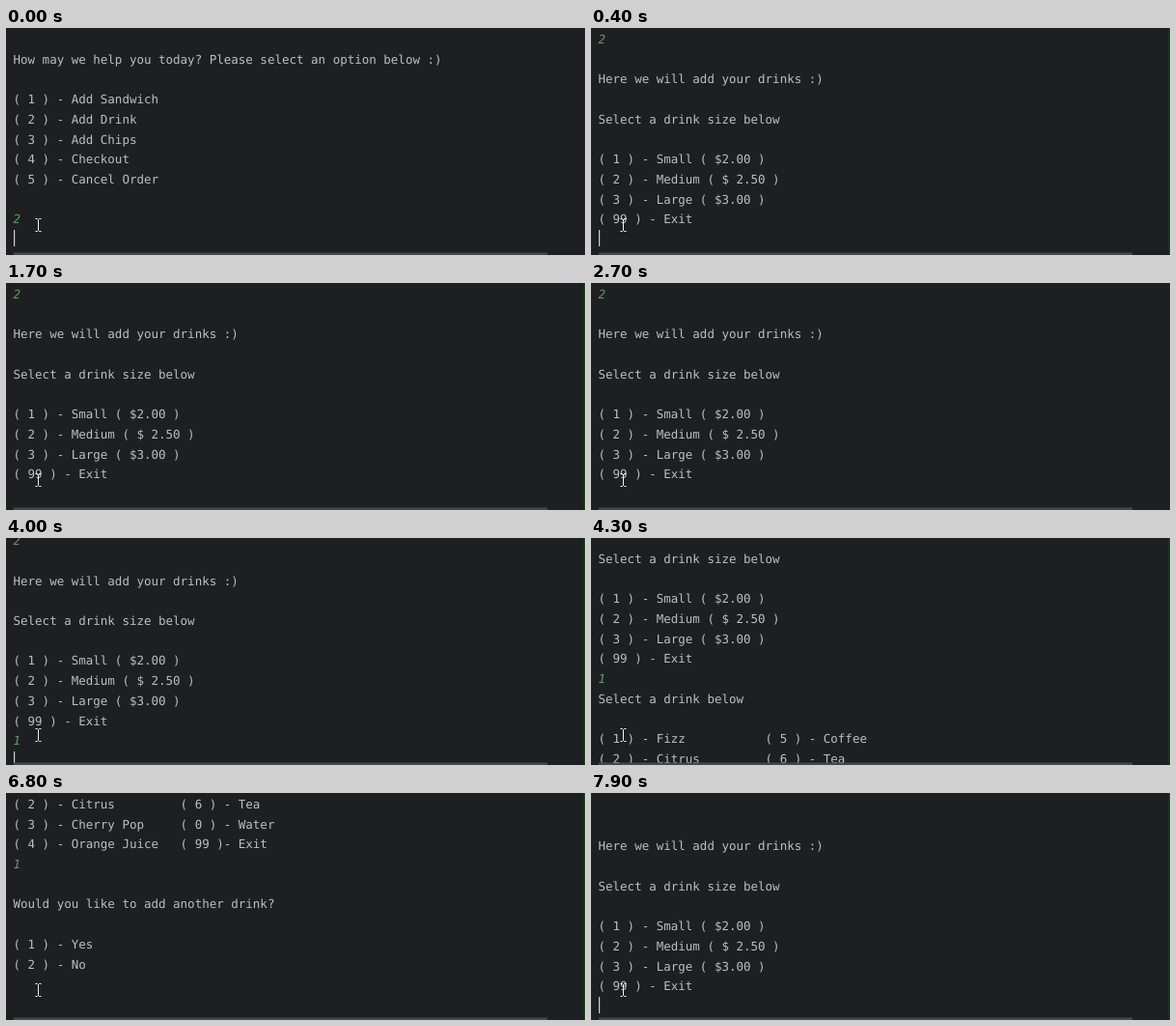
An HTML page that plays this animation: 600 by 235 pixels, repeating every 8 s.

```html
<!DOCTYPE html>
<html lang="en">
<head>
<meta charset="utf-8">
<title>Order console</title>
<style>
  html, body { margin: 0; width: 100%; height: 100%; overflow: hidden; background: #1e1f22; }
  svg { display: block; }
  text {
    font: 12.5px "DejaVu Sans Mono", monospace;
    fill: #bcbec4;
    white-space: pre;
    text-rendering: geometricPrecision;
  }
  .input { fill: #629a68; font-style: italic; }
</style>
</head>
<body>
<svg width="600" height="235" viewBox="0 0 600 235">
  <g id="console">
    <rect id="caret" width="1.2" height="17" fill="#ced0d6"/>
  </g>
  <rect x="8" y="232.5" width="553" height="2.5" fill="#47484a"/>
  <rect id="edge" x="598.5" width="1.5" height="234" fill="#0a450c"/>
  <path d="M30.5 197.5h2l1 1l1-1h2M33.5 198.5v11M30.5 210.5h2l1-1l1 1h2" fill="none" stroke="#f0f0f0"/>
</svg>
<script>
const LOOP = 8000, FRAME = 100;
const LEFT = 7.5, CHAR = 7.53, LINE = 20.7, BASELINE = 16;
const SCROLL_TIME = 120, BLINK_DELAY = 640, BLINK = 500;

const byId = id => document.getElementById(id);
const output = byId("console"), caret = byId("caret"), edge = byId("edge");
const show = (node, visible) => node.setAttribute("visibility", visible ? "visible" : "hidden");

const item = (key, label) => `( ${key} ) - ${label}`;
const menu = labels => labels.map((label, i) => item(i + 1, label));
const pair = (left, right) => left.padEnd(23) + right;

const sizeMenu = [
  "Here we will add your drinks :)", "",
  "Select a drink size below", "",
  ...menu(["Small ( $2.00 )", "Medium ( $ 2.50 )", "Large ( $3.00 )"]),
  item(99, "Exit"),
];

// Each event writes lines from the caret row; `advance` is how far the caret then moves down.
const events = [];
const texts = [];
let rowCount = 0;

function write(time, lines, advance, column, className) {
  lines.forEach((line, i) => {
    const node = document.createElementNS("http://www.w3.org/2000/svg", "text");
    node.setAttribute("x", LEFT);
    node.setAttribute("y", BASELINE + (rowCount + i) * LINE);
    node.setAttribute("class", className);
    node.textContent = line;
    output.append(node);
    texts.push({ node, time });
  });
  rowCount += advance;
  events.push({ time, advance, column, row: rowCount });
}
const print = (time, lines) => write(time, lines, lines.length, 0, "output");
function type(key, typed, entered) {
  write(typed, [key], 0, 1, "input");
  write(entered, [], 1, 0, "input");
}

const before = -LOOP;
print(before, [
  "", "How may we help you today? Please select an option below :)", "",
  ...menu(["Add Sandwich", "Add Drink", "Add Chips", "Checkout", "Cancel Order"]), "",
]);
type("2", before, before);
const bottomRow = rowCount;

print(60, ["", ...sizeMenu]);
type("1", 3600, 3980);
print(4280, [
  "Select a drink below", "",
  pair(item(1, "Fizz"), item(5, "Coffee")),
  pair(item(2, "Citrus"), item(6, "Tea")),
  pair(item(3, "Cherry Pop"), item(0, "Water")),
  pair(item(4, "Orange Juice"), "( 99 )- Exit"),
]);
type("1", 5500, 6060);
print(6090, ["", "Would you like to add another drink?", "", ...menu(["Yes", "No"]), ""]);
type("1", 7400, 7605);
print(7806, ["", "", ...sizeMenu]);

const easeOut = p => 1 - (1 - Math.min(p, 1)) ** 3;

function draw(t) {
  const past = events.filter(event => event.time <= t);
  const last = past.at(-1);
  const scroll = past.reduce(
    (sum, { time, advance }) => sum + advance * easeOut((t - time) / SCROLL_TIME), -bottomRow);
  output.setAttribute("transform", `translate(0 ${-scroll * LINE})`);

  caret.setAttribute("x", Math.floor(LEFT + 0.5 + last.column * CHAR));
  caret.setAttribute("y", last.row * LINE + 2);
  const idle = t - last.time - BLINK_DELAY;
  show(caret, t < BLINK_DELAY || idle < 0 || Math.floor(idle / BLINK) % 2);

  show(edge, t >= 100 && t < 2000 || t >= 3200);
  texts.forEach(({ node, time }) => show(node, time <= t));
}

const start = performance.now();
function tick() {
  const t = (performance.now() - start) % LOOP;
  draw(Math.floor(t / FRAME) * FRAME);
  requestAnimationFrame(tick);
}
tick();
</script>
</body>
</html>
```
